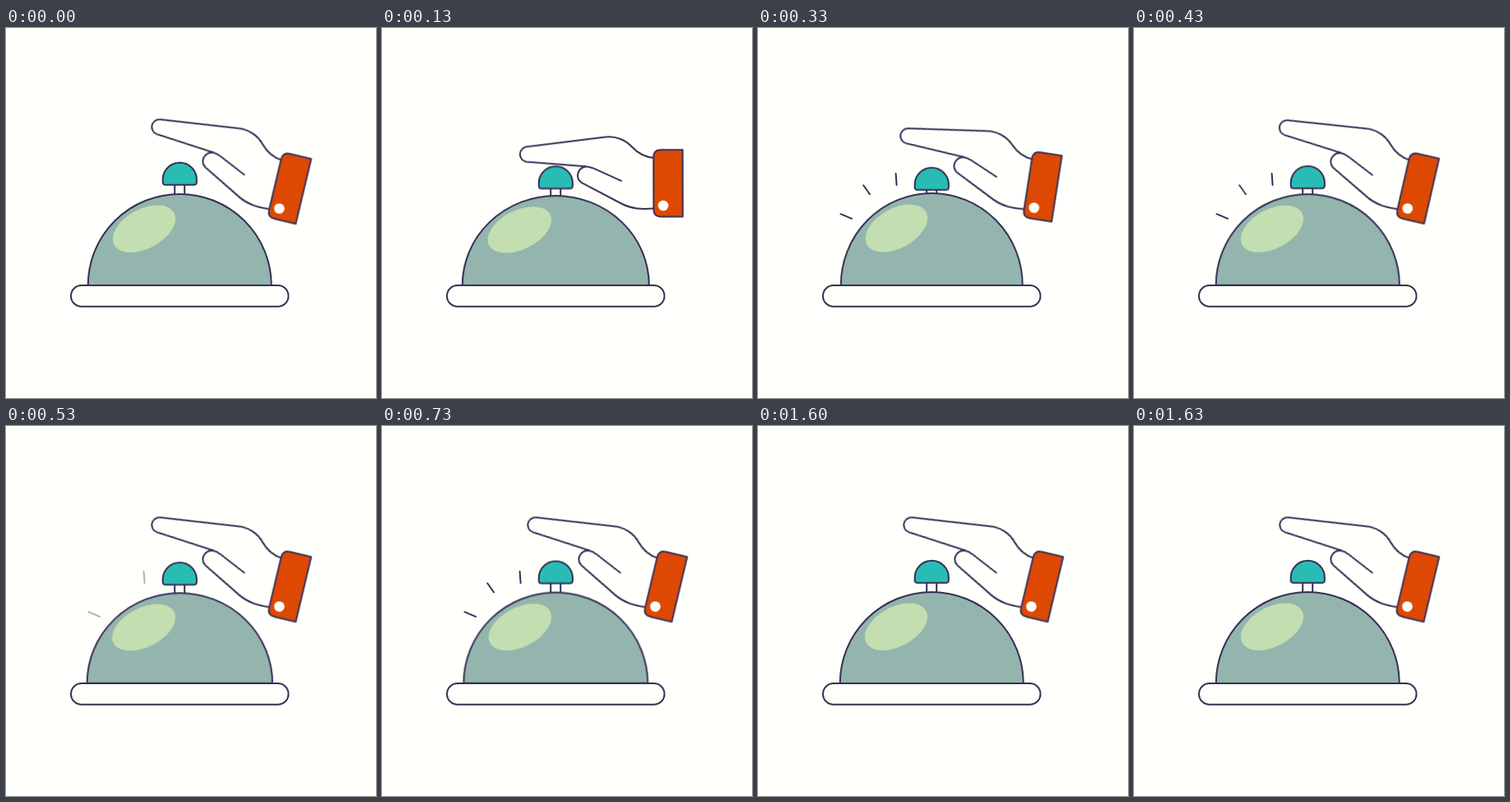
Write an HTML page that moves like this. It is 450x450 px and loops after 1.66 s.

```html
<!DOCTYPE html>
<html lang="en">
<head>
<meta charset="utf-8">
<title>Service bell</title>
<style>
  html, body { margin: 0; width: 100%; height: 100%; overflow: hidden; background: #fffffc; }
  svg { display: block; width: 100vw; height: 100vh; }

  .line { fill: none; stroke: #372f54; stroke-width: 2; stroke-linecap: round; stroke-linejoin: round; }
  .paper { fill: #fffffc; }
  .teal { fill: #29bcb5; }
  .glass { fill: #93b5ad; }
  .shine { fill: #c3deb0; }
  .cloth { fill: #dd4902; }

  .hand, .knob, .dome, .ray { animation: 1660ms linear infinite; }
  .hand { animation-name: tap; transform-origin: 322px 177px; }
  .knob { animation-name: push; }
  .dome { animation-name: wobble; transform-origin: 211.25px 313px; }
  .ray { animation-name: flash; opacity: 0; }
  .ray.early { animation-name: flash-early; }

  @keyframes tap {
    0%, 1.2% { transform: rotate(13.4deg); animation-timing-function: ease-in; }
    7.83% { transform: rotate(0deg); animation-timing-function: ease-out; }
    11.45% { transform: rotate(-4deg); animation-timing-function: ease-in; }
    15% { transform: rotate(0deg); }
    19.88% { transform: rotate(8.8deg); animation-timing-function: ease-out; }
    28%, 100% { transform: rotate(13.4deg); }
  }
  @keyframes push {
    0%, 5.4% { transform: translateY(0); }
    7.83% { transform: translateY(4.3px); animation-timing-function: ease-out; }
    11.45% { transform: translateY(10px); }
    19.88% { transform: translateY(6.2px); }
    31.93% { transform: translateY(2.3px); }
    43.98% { transform: translateY(.6px); }
    64.46%, 100% { transform: translateY(0); }
  }
  @keyframes wobble {
    0%, 1.8% { transform: none; animation-timing-function: ease-in-out; }
    7.83% { transform: scale(1.018, .982); animation-timing-function: ease-out; }
    11.45% { transform: scale(1.022, .978); animation-timing-function: ease-in-out; }
    19.88% { transform: scale(.991, 1.009); animation-timing-function: ease-in-out; }
    31.93% { transform: scale(1.011, .989); animation-timing-function: ease-in-out; }
    38.5% { transform: scale(.996, 1.004); animation-timing-function: ease-in-out; }
    43.98% { transform: scale(1.004, .996); animation-timing-function: ease-in-out; }
    50% { transform: scale(.998, 1.002); animation-timing-function: ease-in-out; }
    64.46%, 100% { transform: none; }
  }
  @keyframes flash {
    0%, 11.5% { opacity: 0; }
    15%, 28% { opacity: 1; }
    31.93% { opacity: .4; }
    34.5% { opacity: 0; }
    39%, 51% { opacity: 1; }
    58%, 100% { opacity: 0; }
  }
  @keyframes flash-early {
    0%, 11.5% { opacity: 0; }
    15%, 25.5% { opacity: 1; }
    31%, 34.5% { opacity: 0; }
    39%, 49% { opacity: 1; }
    56%, 100% { opacity: 0; }
  }
</style>
</head>
<body>
<svg viewBox="0 0 450 450">
  <g class="knob">
    <path class="line paper" d="M205.2 189V214H217.2V189Z"/>
    <path class="line teal" d="M190.7 184.3A20.6 20.6 0 0 1 231.9 184.3V187.2Q231.9 190.8 228.3 190.8H194.3Q190.7 190.8 190.7 187.2Z"/>
  </g>

  <g class="dome">
    <path class="line glass" d="M99.75 313A111.5 111 0 0 1 322.75 313Z"/>
    <ellipse class="shine" cx="168" cy="244.2" rx="41.3" ry="24" transform="rotate(-28 168 244.2)"/>
  </g>
  <rect class="line paper" x="79" y="313" width="264.5" height="25.8" rx="12.9"/>

  <path class="line ray" d="M100.5 226.2L114 231.8"/>
  <path class="line ray early" d="M128.2 191.2L136 202.3"/>
  <path class="line ray" d="M167.6 177L168.6 191"/>

  <g class="hand">
    <path class="line paper" d="M331 158C318 157 310 151 304 144.5C296 136 284 131 272 132.6L175.5 144.3A9.2 9.2 0 0 0 176 162.5L248 168.3C239 170 233.5 181 243 188.2L292 214C304 220.2 315 220.5 331 219.5"/>
    <path class="line" d="M246 168.2C252 168 255 169.4 258 170.8L291 185.8"/>
    <path class="line cloth" d="M365.7 148.3V229.5H339Q330.3 229.5 330.3 220.8V157Q330.3 148.3 339 148.3Z"/>
    <circle class="paper" cx="342" cy="216" r="6.3"/>
  </g>
</svg>
</body>
</html>
```
